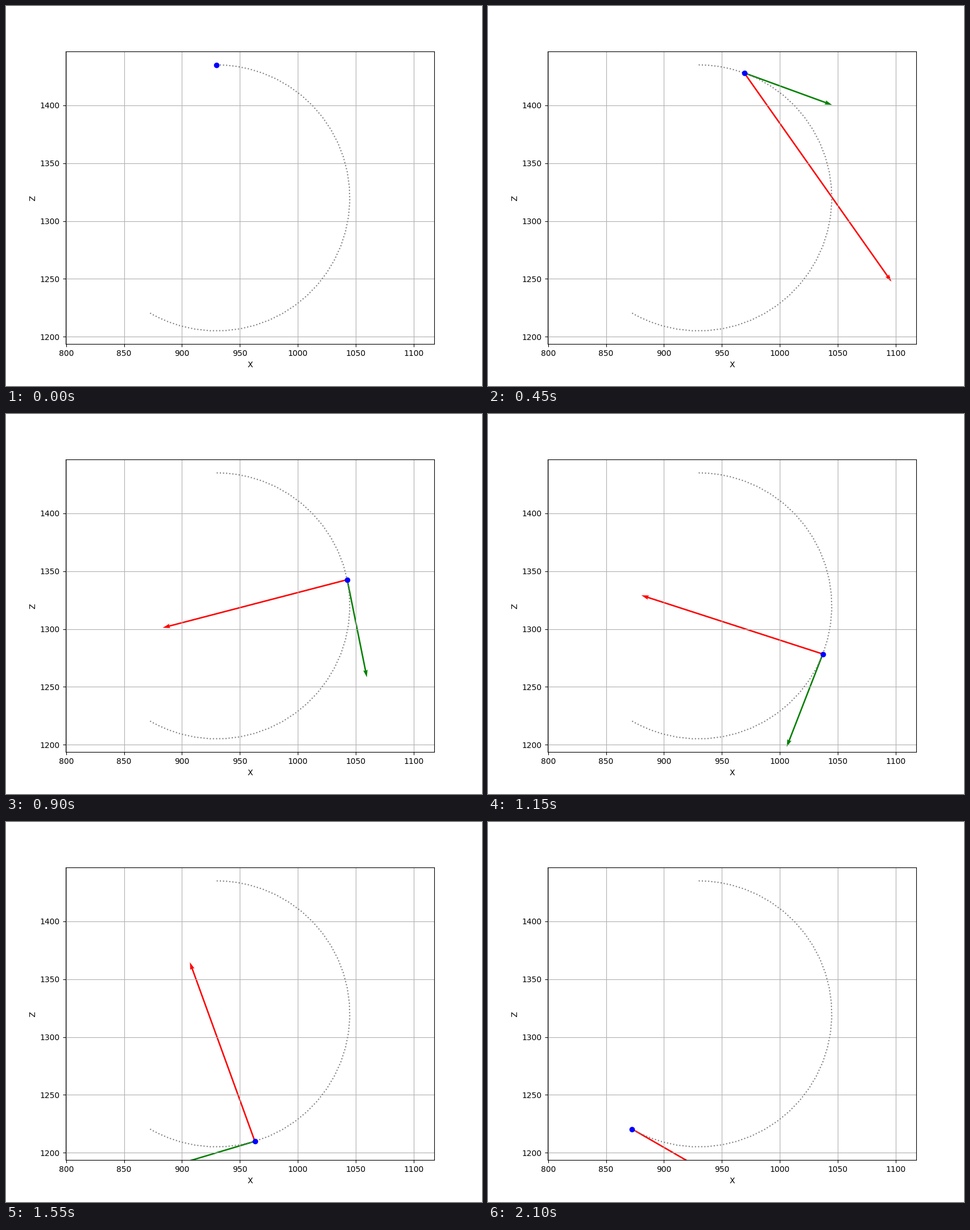
A matplotlib script for the animation above (2.15 s loop, 837 by 669 pixels).

```python
import numpy as np
import matplotlib.pyplot as plt
from matplotlib.animation import FuncAnimation

W, H, DPI = 837, 669, 100
CENTER = np.array([930.0, 1320.0])
RADIUS = 115.0
SWEEP = 210.0                  # degrees, clockwise from the top
CRUISE = 6.515                 # degrees per step
RAMP_UP, RAMP_DOWN = 3.93, 3.6  # half durations of the speed ramps, in steps
STEPS, IDLE = 40, 2
V_GAIN, A_GAIN = 6.58, 110.8


def glide(t, h):
    """Distance covered while speed rises from 0 to 1 with constant jerk over 2h."""
    t = np.maximum(t, 0)
    rest = np.maximum(2 * h - t, 0)
    return np.where(t < h, t**3, 6 * h**2 * (t - h) + rest**3) / (6 * h**2)


def sweep_angle(t):
    brake = RAMP_UP + SWEEP / CRUISE - RAMP_DOWN
    return np.radians(CRUISE * (glide(t, RAMP_UP) - glide(t - brake, RAMP_DOWN)))


theta = sweep_angle(np.arange(STEPS + 1))
pos = CENTER + RADIUS * np.column_stack([np.sin(theta), np.cos(theta)])
tangent = np.column_stack([np.cos(theta), -np.sin(theta)])
speed = RADIUS * np.diff(theta, prepend=theta[0])
vel = speed[:, None] * tangent
acc = np.diff(vel, axis=0, prepend=vel[:1])

# The small surplus keeps the pixel size from rounding down.
fig, ax = plt.subplots(figsize=((W + 0.01) / DPI, (H + 0.01) / DPI), dpi=DPI)
fig.subplots_adjust(left=0.125, right=0.9, bottom=0.11, top=0.88)

z_lim = np.array([1193.5, 1446.5])
half = np.ptp(z_lim) * (0.775 * W) / (0.77 * H) / 2
x_mid = CENTER[0] + RADIUS / 4
ax.set(xlim=(x_mid - half, x_mid + half), ylim=z_lim, xlabel="X", ylabel="Z")
ax.grid(True)

ax.plot(*pos.T, ":", color="gray")
dot, = ax.plot([], [], "o", color="blue")


def arrow(color):
    return ax.quiver(*pos[0], 0, 0, color=color, angles="xy",
                     scale_units="xy", scale=1, width=0.004)


v_arrow, a_arrow = arrow("green"), arrow("red")


def place(quiver, origin, vec):
    quiver.set_offsets([origin])
    quiver.set_UVC([vec[0]], [vec[1]])


def update(frame):
    k = max(frame - IDLE, 0)
    dot.set_data(pos[k:k + 1, 0], pos[k:k + 1, 1])
    place(v_arrow, pos[k], V_GAIN * vel[k])
    place(a_arrow, pos[k], A_GAIN * acc[k])
    return dot, v_arrow, a_arrow


anim = FuncAnimation(fig, update, frames=STEPS + IDLE + 1, interval=50,
                     repeat=True, repeat_delay=0)
plt.show()
```
